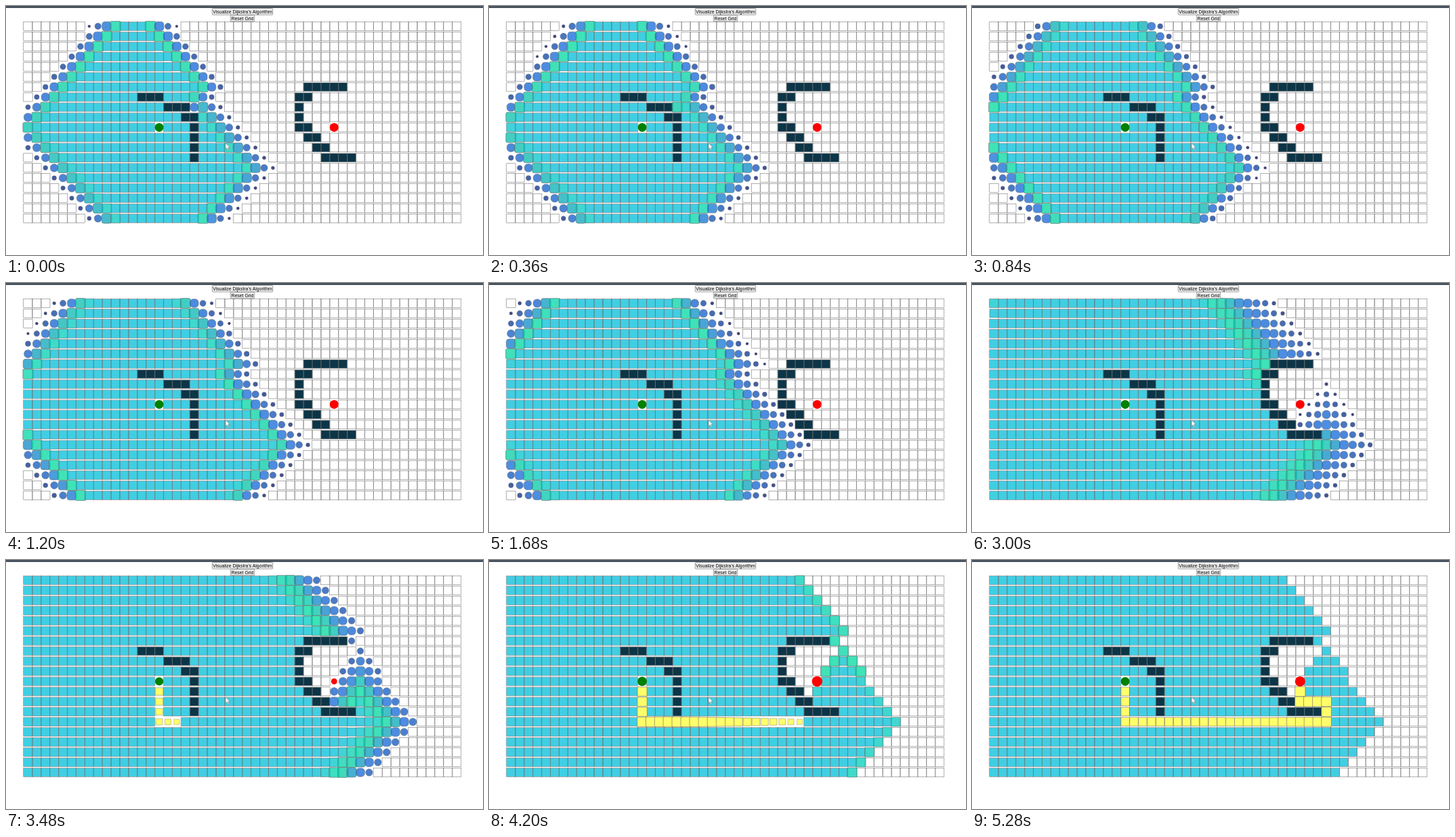
An HTML page with a canvas for the animation above (5.4 s loop, 704 by 368 pixels).

```html
<!DOCTYPE html>
<html lang="en">
<head>
<meta charset="utf-8">
<title>Grid search</title>
<style>
  html, body { margin: 0; width: 100%; height: 100%; overflow: hidden; background: #fff; }
  canvas, svg { position: absolute; left: 0; top: 0; width: 704px; height: 368px; }
  text { font: 6.89px "Liberation Sans", Arial, sans-serif; text-anchor: middle; fill: #000; }
  .btn { fill: #efefef; stroke: #666; stroke-width: .6; }
</style>
</head>
<body>
<canvas id="grid"></canvas>
<svg viewBox="0 0 704 368">
  <rect width="704" height="3" fill="#47525e"/>
  <rect class="btn" x="304.3" y="3.5" width="89.4" height="9.6" rx="1"/>
  <text x="349" y="10.5">Visualize Dijkstra's Algorithm</text>
  <rect class="btn" x="331.3" y="13.5" width="35.4" height="9.4" rx="1"/>
  <text x="349" y="20.5">Reset Grid</text>
  <path d="M324 202.6v9l2.1-1.9 1.4 3.2 1.5-.7-1.4-3.1h2.8z" fill="#fff" stroke="#777" stroke-width=".6"/>
</svg>
<script>
const W = 704, H = 368, COLS = 50, ROWS = 20;
const LEFT = 26, MID = 29.96, PITCH = 14.947;
const CW = 12.91, CH = 12.4, EDGE = .52;
const LOOP = 5400, STEP = 120;
const VISIT_GAP = 9, PATH_AT = 3195, PATH_GAP = 44.75, POP_MS = 1390;
const LINE = '#686868', WALL = '#0c3547', YELLOW = '#fffe6a', DONE = 'rgba(0,190,218,.75)';

// Wall runs: row, first column, last column
const RUNS = [
  [7, 13, 15], [8, 16, 18], [9, 18, 19], [10, 19, 19], [11, 19, 19], [12, 19, 19], [13, 19, 19],
  [6, 32, 36], [7, 31, 32], [8, 31, 31], [9, 31, 31], [10, 31, 32], [11, 32, 33], [12, 33, 34], [13, 34, 37]
];

const cells = [];
for (let r = 0; r < ROWS; r++)
  for (let c = 0; c < COLS; c++)
    cells.push({ r, c, x: LEFT + (c + .5) * CW, y: MID + r * PITCH, seen: Infinity, step: Infinity });

const at = (r, c) => r >= 0 && r < ROWS && c >= 0 && c < COLS ? cells[r * COLS + c] : null;
for (const [r, a, b] of RUNS) for (let c = a; c <= b; c++) at(r, c).wall = true;
const start = at(10, 15), goal = at(10, 35);

// Breadth-first search: up, left, right, down; the latest visitor becomes the parent
function search() {
  const order = [start], queued = new Set(order), closed = new Set();
  for (let i = 0; i < order.length; i++) {
    const n = order[i];
    closed.add(n);
    if (n === goal) return order.slice(0, i + 1);
    for (const [dr, dc] of [[-1, 0], [0, -1], [0, 1], [1, 0]]) {
      const m = at(n.r + dr, n.c + dc);
      if (!m || m.wall || closed.has(m)) continue;
      m.parent = n;
      if (!queued.has(m)) { queued.add(m); order.push(m); }
    }
  }
  return order;
}

const order = search();
const first = order.indexOf(at(0, 17));
order.forEach((n, i) => { n.seen = (i - first) * VISIT_GAP - 4; });

const path = [];
for (let n = goal; n; n = n.parent) path.unshift(n);
path.forEach((n, i) => { n.step = PATH_AT + i * PATH_GAP; });

// cubic-bezier(0, 0, .58, 1)
function easeOut(p) {
  if (p <= 0) return 0;
  if (p >= 1) return 1;
  let a = 0, b = 1, u;
  for (let i = 0; i < 16; i++) {
    u = (a + b) / 2;
    if (1.74 * (1 - u) * u * u + u * u * u < p) a = u; else b = u;
  }
  return 3 * (1 - u) * u * u + u * u * u;
}

const mix = (a, b, k) => a + (b - a) * k;
const SHADES = [[0, [0, 0, 66]], [.5, [17, 104, 217]], [.75, [0, 217, 159]], [1, [0, 190, 218]]];

function shade(p) {
  let i = 0;
  while (i < 2 && p > SHADES[i + 1][0]) i++;
  const [p0, a] = SHADES[i], [p1, b] = SHADES[i + 1];
  const k = easeOut((p - p0) / (p1 - p0));
  return `rgba(${a.map((v, j) => Math.round(mix(v, b[j], k)))},.75)`;
}

// Grows past full size at the peak, then settles
const pop = (p, from, peak) => p < peak
  ? mix(from, 1.2, easeOut(p / peak))
  : mix(1.2, 1, easeOut((p - peak) / (1 - peak)));
const visitScale = p => pop(p, .3, .75);
const pathScale = p => pop(p, .6, .5);
const progress = (n, t) => [(t - n.seen) / POP_MS, (t - n.step) / POP_MS];

const canvas = document.getElementById('grid');
const g = canvas.getContext('2d');
const dpr = window.devicePixelRatio || 1;
canvas.width = W * dpr;
canvas.height = H * dpr;

function disc(n, color, t) {
  const [p, q] = progress(n, t);
  const scale = q >= 0 ? pathScale(q) : p >= 0 ? visitScale(p) : 1;
  g.fillStyle = color;
  g.beginPath();
  g.arc(n.x, n.y, CW / 2 * scale, 0, 7);
  g.fill();
}

function box(n, color, scale, round) {
  const w = CW * scale, h = mix(CW, CH, 1 - round * 2) * scale;
  g.beginPath();
  g.roundRect(n.x - w / 2, n.y - h / 2, w, h, h * round);
  g.fillStyle = color;
  g.fill();
  g.lineWidth = EDGE * scale;
  g.stroke();
}

function draw(t) {
  g.setTransform(dpr, 0, 0, dpr, 0, 0);
  g.fillStyle = '#fff';
  g.fillRect(0, 0, W, H);
  g.strokeStyle = LINE;
  const flat = [], moving = [];
  for (const n of cells) {
    if (n === start || n === goal) continue;
    const [p, q] = progress(n, t);
    if (q >= 0 && q < 1) moving.push([n, YELLOW, pathScale(q), 0]);
    else if (q < 0 && p >= 0 && p < 1)
      moving.push([n, shade(p), visitScale(p), Math.min(.5, 1 - easeOut(p))]);
    else flat.push([n, n.wall ? WALL : q >= 1 ? YELLOW : p >= 1 ? DONE : '#fff']);
  }
  for (const [n, color] of flat) {
    g.fillStyle = color;
    g.fillRect(n.x - CW / 2, n.y - CH / 2, CW, CH);
  }
  g.lineWidth = EDGE;
  const w = CW + EDGE, h = CH + EDGE;
  for (const [n] of flat) g.strokeRect(n.x - w / 2, n.y - h / 2, w, h);
  for (const m of moving) box(...m);
  disc(start, '#008000', t);
  disc(goal, '#ff0000', t);
}

const origin = performance.now();
function tick() {
  const t = (performance.now() - origin) % LOOP;
  draw(Math.floor(t / STEP) * STEP);
  requestAnimationFrame(tick);
}
tick();
</script>
</body>
</html>
```
